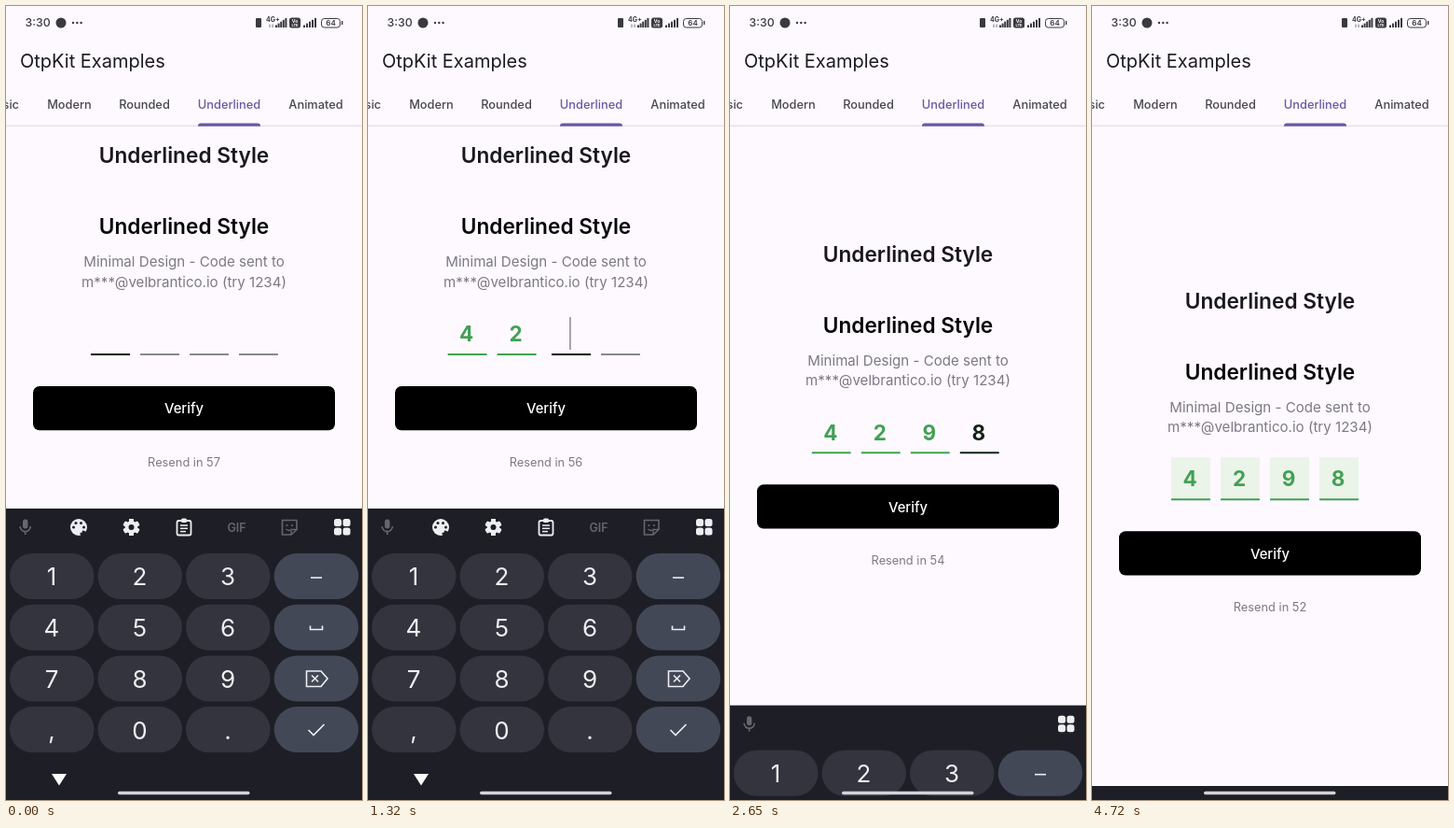
An HTML page with a canvas that plays this animation: 382x850 px, repeating every 4.76 s.

```html
<!DOCTYPE html>
<html lang="en">
<head>
<meta charset="utf-8">
<title>OTP entry</title>
<style>
html, body { margin: 0; width: 100%; height: 100%; overflow: hidden; background: #fdf9ff; }
canvas { display: block; }
</style>
</head>
<body>
<canvas id="stage" width="382" height="850"></canvas>
<script>
const ctx = document.getElementById('stage').getContext('2d');
const LOOP = 4760;
const INK = '#3a393f', PAPER = '#fdf9ff', MUTED = '#7d7884', TAB = '#49454f', ACTIVE = '#6a58a2';
const BOARD = '#1e1f26', KEY = '#33343e', SIDE_KEY = '#434857', LIGHT = '#eeeef2', DIM = '#65666e';
const BLACK = [8, 8, 10], GREEN = [66, 160, 84], IDLE = [140, 134, 142];

// Time at which each digit is typed and starts turning green.
const entries = [
  { digit: '4', at: 270, green: 370 },
  { digit: '2', at: 1050, green: 1100 },
  { digit: '9', at: 1900, green: 1950 },
  { digit: '8', at: 2490, green: 2620 }
];
const CLOSE_AT = 2500, CLOSE_MS = 243, CLOSE_BY = 310.5;

const clamp = v => Math.max(0, Math.min(1, v));
const progress = (t, start, ms) => clamp((t - start) / ms);
const smooth = p => p * p * (3 - 2 * p);
const mix = (a, b, p) => `rgb(${a.map((v, i) => Math.round(v + (b[i] - v) * p))})`;

// Places text with its capital height centred on y.
function text(str, x, y, size, color, weight = 400, align = 'center') {
  ctx.font = `${weight} ${size}px Inter, sans-serif`;
  ctx.textAlign = align;
  ctx.fillStyle = color;
  ctx.fillText(str, x, y + size * 0.364);
}
function rect(x, y, w, h, color) {
  ctx.fillStyle = color;
  ctx.fillRect(x, y, w, h);
}
function round(x, y, w, h, r, color, stroke) {
  ctx.beginPath();
  ctx.roundRect(x, y, w, h, r);
  if (color) { ctx.fillStyle = color; ctx.fill(); }
  if (stroke) { ctx.strokeStyle = stroke; ctx.stroke(); }
}
function dot(x, y, r, color) {
  ctx.fillStyle = color;
  ctx.beginPath();
  ctx.arc(x, y, r, 0, Math.PI * 2);
  ctx.fill();
}
function line(points, color, width = 1.6, close = false) {
  ctx.beginPath();
  points.forEach(([x, y]) => ctx.lineTo(x, y));
  if (close) ctx.closePath();
  ctx.strokeStyle = color;
  ctx.lineWidth = width;
  ctx.stroke();
}

function signal(x, width) {
  for (let i = 0; i < 5; i++) {
    const h = 2.5 + i * 1.9;
    rect(x + i * width / 5, 23 - h, 2, h, INK);
  }
}

function statusBar() {
  text('3:30', 20.5, 18, 12.3, INK, 500, 'left');
  dot(59, 18, 5.5, INK);
  for (let i = 0; i < 3; i++) dot(72 + i * 4.3, 18, 1.2, INK);
  round(268, 13, 6, 10, 1, INK);
  text('4G+', 279, 14.5, 7, INK, 700, 'left');
  line([[283, 19.5], [283, 23]], MUTED, 1);
  line([[286, 19.5], [286, 23]], MUTED, 1);
  signal(289, 13);
  round(304, 12.5, 12, 11, 2.5, INK);
  text('Vo', 310, 16, 5, PAPER, 700);
  text('LTE', 310, 20.5, 4, PAPER, 700);
  signal(319, 15);
  ctx.lineWidth = 1;
  round(338.5, 13.5, 20, 9.5, 3, null, INK);
  text('64', 348.5, 18.2, 8, INK, 600);
  rect(360, 16, 1.4, 4, INK);
}

function header() {
  statusBar();
  text('OtpKit Examples', 15, 58.5, 20, '#1d1b20', 400, 'left');
  const tab = (label, x) => text(label, x, 105.5, 12.8, TAB, 500);
  text('Basic', 14, 105.5, 12.8, TAB, 500, 'right');
  tab('Modern', 68);
  tab('Rounded', 148.5);
  tab('Animated', 332.5);
  text('Underlined', 239.5, 105.5, 12.8, ACTIVE, 500);
  rect(0, 127.7, 382, 1, '#dcd6e0');
  round(206, 125.6, 67, 3.2, [3, 3, 0, 0], ACTIVE);
}

function cells(t) {
  const typed = entries.filter(e => t >= e.at);
  const latest = typed.length ? typed[typed.length - 1].at : 0;
  const shift = -6 * progress(t, latest, 300);
  const success = progress(t, 2760, 200);
  entries.forEach((entry, i) => {
    const filled = i < typed.length;
    const focused = i === typed.length;
    const x = 91 + i * 53 + (filled ? shift : 0);
    const focus = focused ? (i ? progress(t, latest, 220) : 1) : 0;
    const color = filled
      ? mix(BLACK, GREEN, progress(t, entry.green, 180))
      : mix(IDLE, BLACK, focus);
    if (success) {
      ctx.globalAlpha = success;
      rect(x, 328, 42, 45, '#ebf4e8');
      ctx.globalAlpha = 1;
    }
    round(x, 371.9, 42, 2, 0.5, color);
    if (filled) text(entry.digit, x + 20, 351, 22.5, color, 700);
    if (focused && i && t - latest < 500) rect(x + 19.3, 333, 1.3, 35, '#77757c');
  });
}

function content(t, closed) {
  ctx.save();
  ctx.translate(0, closed / 2);
  text('Underlined Style', 191, 160, 22.7, '#1a181d', 600);
  text('Underlined Style', 191, 236, 22.7, '#050506', 600);
  text('Minimal Design - Code sent to', 191, 274, 15.1, MUTED);
  text('m***@velbrantico.io (try 1234)', 191, 295.5, 15.1, MUTED);
  cells(t);
  round(29, 407, 324, 47.2, 7, '#000');
  text('Verify', 191, 431, 14.8, '#fff', 500);
  const seconds = 57 - Math.floor((t + 450) / 1000);
  text('Resend in ' + seconds, 191, 488, 12.8, MUTED);
  ctx.restore();
}

function mic() {
  round(18, 549.5, 5.4, 10, 2.7, DIM);
  ctx.beginPath();
  ctx.arc(20.7, 557, 5.6, 0, Math.PI);
  ctx.strokeStyle = DIM;
  ctx.lineWidth = 1.6;
  ctx.stroke();
  line([[20.7, 562], [20.7, 566]], DIM);
}

function palette() {
  dot(78, 558, 9, LIGHT);
  [[72.5, 558], [75, 553.5], [80.5, 553.5], [83.5, 558]].forEach(([x, y]) => dot(x, y, 1.5, BOARD));
  dot(82.5, 564.5, 3, BOARD);
  dot(80, 562, 2, LIGHT);
}

function gear() {
  ctx.save();
  ctx.translate(134.5, 558);
  for (let i = 0; i < 6; i++) {
    round(-2.5, -9, 5, 18, 1, LIGHT);
    ctx.rotate(Math.PI / 3);
  }
  dot(0, 0, 6.8, LIGHT);
  dot(0, 0, 3, BOARD);
  ctx.restore();
}

function clipboard() {
  ctx.lineWidth = 1.8;
  round(183.5, 551, 15, 15.5, 2, null, LIGHT);
  round(188, 548.5, 6, 4.5, 1.5, LIGHT);
  [556, 559.3, 562.6].forEach((y, i) => line([[187, y], [i === 2 ? 193 : 195, y]], LIGHT, 1.5));
}

function sticker() {
  line([[296.5, 550.5], [312, 550.5], [312, 560.5], [306, 566], [296.5, 566]], DIM, 1.6, true);
  line([[306, 566], [306, 560.5], [312, 560.5]], DIM, 1.4);
  dot(301.5, 556, 1.1, DIM);
  dot(307, 556, 1.1, DIM);
  line([[300.5, 560], [303, 561.5], [305, 561]], DIM, 1.3);
}

function toolbar(closed) {
  mic();
  if (!closed) {
    palette();
    gear();
    clipboard();
    text('GIF', 247.5, 558.5, 12.5, DIM, 600);
    sticker();
  }
  for (const x of [352, 361.5])
    for (const y of [549, 558.5]) round(x, y, 8, 8, 2.5, LIGHT);
}

function sideIcons() {
  line([[327, 612], [339, 612]], LIGHT);
  line([[326.5, 663.5], [326.5, 667.5], [339.5, 667.5], [339.5, 663.5]], LIGHT);
  line([[322.5, 712], [338, 712], [345, 720], [338, 728.5], [322.5, 728.5]], LIGHT, 1.6, true);
  line([[328, 716.5], [335, 723.5]], LIGHT);
  line([[335, 716.5], [328, 723.5]], LIGHT);
  line([[324.5, 775], [330, 780.5], [341.5, 769]], LIGHT);
}

function keyboard(closed) {
  rect(0, Math.min(538 + closed, 835), 382, 312, BOARD);
  if (closed < CLOSE_BY) {
    ctx.save();
    ctx.translate(0, closed);
    toolbar(closed);
    ['123', '456', '789', ',0.'].forEach((row, r) => {
      const y = 586 + r * 54.7;
      [...row].forEach((label, c) => {
        const x = 4 + c * 94.5;
        round(x, y, 90.5, 49, 24.5, KEY);
        text(label, x + 45, y + 25, 26, LIGHT, 400);
      });
      round(287.7, y, 90.5, 49, 24.5, SIDE_KEY);
    });
    sideIcons();
    ctx.fillStyle = '#fff';
    ctx.beginPath();
    ctx.moveTo(49, 822);
    ctx.lineTo(65, 822);
    ctx.lineTo(57, 834.5);
    ctx.fill();
    ctx.restore();
  }
  round(120, 840.8, 141.5, 3.4, 1.7, '#d4d4d8');
}

function draw(t) {
  rect(0, 0, 382, 850, PAPER);
  const closed = CLOSE_BY * smooth(progress(t, CLOSE_AT, CLOSE_MS));
  content(t, closed);
  header();
  keyboard(closed);
}

const start = performance.now();
function frame() {
  draw((performance.now() - start) % LOOP);
  requestAnimationFrame(frame);
}
frame();
</script>
</body>
</html>
```
